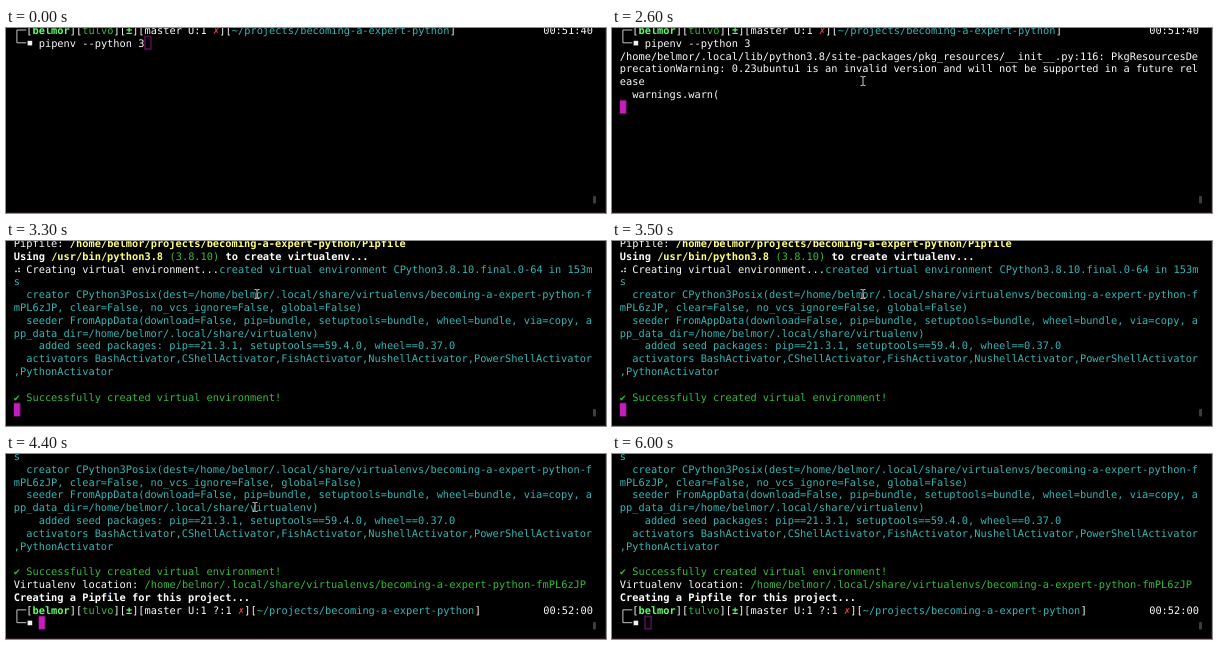
Write an HTML page that moves like this. It is 600 px wide and 185 px high and loops after 6100 ms.

```html
<!DOCTYPE html>
<html lang="en">
<head>
<meta charset="utf-8">
<title>Terminal session</title>
<style>
  html, body { margin: 0; width: 100%; height: 100%; overflow: hidden; background: #000; }
  svg { display: block; width: 600px; height: 185px; }
  text {
    font: 10.345px "DejaVu Sans Mono", "DejaVu Sans", monospace;
    fill: #fafafa; white-space: pre; text-rendering: geometricPrecision;
  }
  .b { font-weight: bold; fill: #fff; }
  .c { fill: #36b6b4; }
  .g { fill: #36bb3e; }
  .G { font-weight: bold; fill: #62ff6a; }
  .y { font-weight: bold; fill: #ffff80; }
  .r { fill: #e0444a; }
  .frame { fill: none; stroke: #c4c4c4; }
  .block { fill: #c41fbd; }
  .hollow { fill: none; stroke: #8c1c86; }
  .beam { fill: none; stroke: #c8c8c8; }
</style>
</head>
<body>
<svg viewBox="0 0 600 185">
  <g id="log">
    <g id="cursor">
      <rect class="block" id="block" y="-.3" width="6.4" height="13.4"/>
      <rect class="hollow" id="hollow" x=".2" y=".1" width="6" height="12.6"/>
    </g>
  </g>
  <rect x="587" y="168" width="3" height="7.5" rx="1" fill="#3e3e3e"/>
  <path d="M599.5 0V185" stroke="#1c1c1c"/>
  <path d="M0 184.5H600" stroke="#24131f"/>
  <path class="beam" id="pointer" d="M-2.5 -4.5H-1L0 -3.8L1 -4.5H2.5M0 -3.8V3.8M-2.5 4.5H-1L0 3.8L1 4.5H2.5"/>
</svg>
<script>
const LOOP = 6100, LEFT = 7.8, TOP = -4.4, CELL = 6.228, ROW = 12.82;
const log = document.getElementById('log');
const cursor = document.getElementById('cursor');
const sheet = document.head.appendChild(document.createElement('style'));
let count = 0;

// stops: [milliseconds, declarations]; each one holds until the next unless eased
function play(el, stops, easing = 'step-end') {
  const name = 'k' + count++;
  const body = stops.map(([ms, css]) => `${(ms - (ms && 8)) / LOOP * 100}% {${css}}`).join(' ');
  sheet.textContent += `@keyframes ${name} {${body}}\n`;
  const own = `${name} ${LOOP}ms ${easing} infinite`;
  el.style.animation = el.style.animation ? `${el.style.animation}, ${own}` : own;
}

function show(el, from, to = LOOP + 8) {
  const stops = [[0, `visibility:${from ? 'hidden' : 'visible'}`]];
  if (from) stops.push([from, 'visibility:visible']);
  stops.push([to, 'visibility:hidden']);
  play(el, stops);
}

function add(tag, attrs, parent) {
  const el = document.createElementNS('http://www.w3.org/2000/svg', tag);
  for (const key in attrs) el.setAttribute(key, attrs[key]);
  return parent.insertBefore(el, parent === log ? cursor : null);
}

function write(group, row, col, parts) {
  for (const [style, str] of parts) {
    const el = add('text', { class: style, x: LEFT + col * CELL, y: TOP + 10.3 + row * ROW }, group);
    el.textContent = str;
    col += str.length;
  }
}

function block(from) {
  const group = add('g', {}, log);
  if (from) show(group, from);
  return group;
}

function print(group, row, ...lines) {
  lines.forEach((parts, i) => write(group, row + i, 0, parts));
}

function prompt(group, row, status, clock) {
  const y = TOP + (row + .5) * ROW;
  add('path', { class: 'frame', d: `M20.3 ${y}H10.9v${ROW}H20.3` }, group);
  add('rect', { x: 21.6, y: y + ROW - 2, width: 4.6, height: 4.6, fill: '#f2f2f2' }, group);
  write(group, row, 2, [
    ['', '['], ['G', 'belmor'], ['', ']['], ['g', 'tulvo'], ['', ']['], ['G', '±'],
    ['', `][master ${status} `], ['r', '✗'], ['', ']['],
    ['c', '~/projects/becoming-a-expert-python'], ['', ']']
  ]);
  write(group, row, 85, [['', clock]]);
}

const first = block(0);
prompt(first, 0, 'U:1', '00:51:40');
write(first, 1, 4, [['', 'pipenv --python 3']]);

print(block(2000), 2,
  [['', '/home/belmor/.local/lib/python3.8/site-packages/pkg_resources/__init__.py:116: PkgResourcesDe']],
  [['', 'precationWarning: 0.23ubuntu1 is an invalid version and will not be supported in a future rel']],
  [['', 'ease']],
  [['', '  warnings.warn(']]);

print(block(2700), 6,
  [['b', 'Creating a virtualenv for this project...']],
  [['', 'Pipfile: '], ['y', '/home/belmor/projects/becoming-a-expert-python/Pipfile']],
  [['b', 'Using '], ['y', '/usr/bin/python3.8'], ['g', ' (3.8.10) '], ['b', 'to create virtualenv...']]);

write(block(2800), 9, 2, [['', 'Creating virtual environment...']]);
[...'⠹⠸⠼⠴'].forEach((dots, i) => {
  const group = add('g', {}, log);
  write(group, 9, 0, [['', dots]]);
  show(group, 2800 + i * 100, i < 3 ? 2900 + i * 100 : undefined);
});

const built = block(3100);
write(built, 9, 33, [['c', 'created virtual environment CPython3.8.10.final.0-64 in 153m']]);
print(built, 10, ...[
  's',
  '  creator CPython3Posix(dest=/home/belmor/.local/share/virtualenvs/becoming-a-expert-python-f',
  'mPL6zJP, clear=False, no_vcs_ignore=False, global=False)',
  '  seeder FromAppData(download=False, pip=bundle, setuptools=bundle, wheel=bundle, via=copy, a',
  'pp_data_dir=/home/belmor/.local/share/virtualenv)',
  '    added seed packages: pip==21.3.1, setuptools==59.4.0, wheel==0.37.0',
  '  activators BashActivator,CShellActivator,FishActivator,NushellActivator,PowerShellActivator',
  ',PythonActivator'
].map(str => [['c', str]]));
write(built, 19, 0, [['g', '✔ Successfully created virtual environment!']]);

const done = block(3600);
print(done, 20,
  [['', 'Virtualenv location: '], ['g', '/home/belmor/.local/share/virtualenvs/becoming-a-expert-python-fmPL6zJP']],
  [['b', 'Creating a Pipfile for this project...']]);
prompt(done, 22, 'U:1 ?:1', '00:52:00');

const scroll = rows => `transform:translateY(${-rows * ROW}px)`;
play(log, [[0, scroll(0)], [3100, scroll(7)], [3600, scroll(10)]]);

const cell = (col, row) => `transform:translate(${LEFT + col * CELL}px,${TOP + row * ROW}px)`;
play(cursor, [
  [0, cell(21, 1)], [1600, cell(0, 2)], [2000, cell(0, 6)],
  [2700, cell(0, 9)], [3100, cell(0, 20)], [3600, cell(4, 23)]
]);
play(document.getElementById('block'), [
  [0, 'visibility:hidden'], [800, 'visibility:visible'], [2800, 'visibility:hidden'],
  [3100, 'visibility:visible'], [6000, 'visibility:hidden']
]);
play(document.getElementById('hollow'), [
  [0, 'visibility:visible'], [800, 'visibility:hidden'], [6000, 'visibility:visible']
]);

const pointer = document.getElementById('pointer');
const at = (x, y) => `transform:translate(${x}px,${y}px)`;
show(pointer, 100, 5900);
play(pointer, [
  [0, at(404, 139)], [100, at(404, 139)], [800, at(251, 53)], [4200, at(251, 53)],
  [4300, at(249, 53)], [5200, at(249, 53)], [5600, at(369, 82)], [LOOP + 8, at(369, 82)]
], 'ease-in-out');
</script>
</body>
</html>
```
